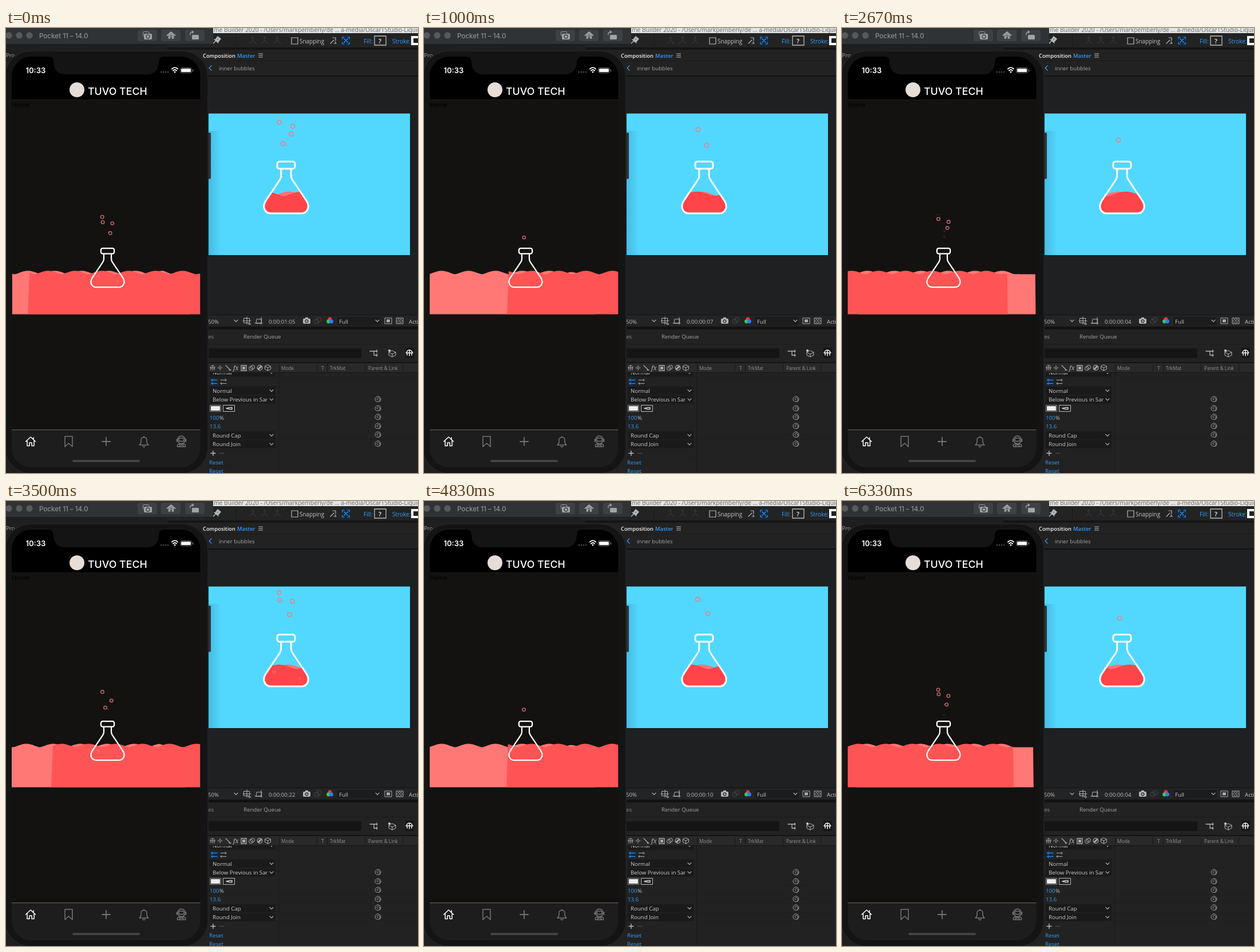
Recreate the animation shown at these times as an HTML page with a canvas. Size 720 px wide and 778 px high, loop 6.49 s.

```html
<!DOCTYPE html>
<html lang="en">
<head>
<meta charset="utf-8">
<title>Flask animation preview</title>
<style>
  html, body { margin: 0; height: 100%; overflow: hidden; background: #1f1f1f; }
  canvas { display: block; }
</style>
</head>
<body>
<canvas id="stage" width="720" height="778"></canvas>
<script>
const ctx = document.getElementById('stage').getContext('2d');
const UI = '"Open Sans", sans-serif', PHONE = 'Inter, sans-serif';
const BLUE = '#2f9cff', GREY = '#a4a4a4', WHITE = '#f4f4f4';

function box(x, y, w, h, color, r = 0) {
  ctx.fillStyle = color;
  ctx.beginPath();
  ctx.roundRect(x, y, w, h, r);
  ctx.fill();
}
function frame(x, y, w, h, color, r = 0, width = 1) {
  ctx.strokeStyle = color;
  ctx.lineWidth = width;
  ctx.beginPath();
  ctx.roundRect(x, y, w, h, r);
  ctx.stroke();
}
function circle(x, y, r, color, width) {
  ctx.beginPath();
  ctx.arc(x, y, r, 0, 7);
  if (width) { ctx.strokeStyle = color; ctx.lineWidth = width; ctx.stroke(); }
  else { ctx.fillStyle = color; ctx.fill(); }
}
function line(d, color, width = 1, x = 0, y = 0) {
  ctx.save();
  ctx.translate(x, y);
  ctx.strokeStyle = color;
  ctx.lineWidth = width;
  ctx.lineCap = ctx.lineJoin = 'round';
  ctx.stroke(new Path2D(d));
  ctx.restore();
}
function text(s, x, y, size, color, font = UI, weight = 400) {
  ctx.font = `${weight} ${size}px ${font}`;
  ctx.fillStyle = color;
  ctx.fillText(s, x, y);
}
function clipped(path, draw) {
  ctx.save();
  ctx.clip(path);
  draw();
  ctx.restore();
}
function rectPath(x, y, w, h, r = 0) {
  const p = new Path2D();
  p.roundRect(x, y, w, h, r);
  return p;
}
// Piecewise linear interpolation through [x, y] pairs.
function track(keys, x) {
  let i = 1;
  while (i < keys.length - 1 && x > keys[i][0]) i++;
  const [[x0, y0], [x1, y1]] = [keys[i - 1], keys[i]];
  return y0 + (y1 - y0) * (x - x0) / (x1 - x0);
}

// ---- flask scene; origin is the centre of the cap ----
const flask = new Path2D('M-8.7 7V18Q-8.7 22-11 25.5L-35.5 62C-43 74-36 84-27 84H27C36 84 43 74 35.5 62L11 25.5Q8.7 22 8.7 18V7');
const frontEdge = [[0, 172], [3.6, 148], [13.6, 77], [18, 41], [26.1, -4], [29.9, -20]];
const WAVE = 62.7, WIDTH = 413, CYCLE = 8.65, LIFE = 16.5;

function liquid(edge, crest, color, slant, flatEnd) {
  const left = (edge - 177.5) / 0.75;
  ctx.beginPath();
  ctx.moveTo(left - slant, 148);
  for (let d = 0; d <= WIDTH; d += 2) {
    const fade = Math.max(0, Math.min(1, (WIDTH - flatEnd - d) / 24));
    const lift = Math.abs(Math.cos(Math.PI * (left + d - crest) / WAVE)) ** 1.4;
    ctx.lineTo(left + d, 54 - 8 * lift * fade);
  }
  ctx.lineTo(left + WIDTH, 148);
  ctx.fillStyle = color;
  ctx.fill();
}
function liquids(p, front, back) {
  liquid(23 + 1.5 * (p - 26.1), -8 + 0.7 * (p - 3), back, 0, 36);
  liquid(track(frontEdge, p), 18.5 - 6.3 * (p - 3), front, 4, 0);
}
function risers(p, birth, size, place) {
  for (let k = 0; k < 3; k++) {
    const age = p - birth - k * CYCLE;
    if (age < 0 || age > LIFE + 2.5) continue;
    const [x, y] = place(age);
    if (age < LIFE) {
      circle(x, y, size * Math.min(1, 0.35 + age), '#f4797d', size * 0.4);
    } else if (size > 2) {
      for (let a = 0; a < 6; a++)
        circle(x + 5 * Math.cos(a), y + 5 * Math.sin(a), 0.6, '#d8979f');
    }
  }
}
function flaskScene(p) {
  risers(p, 3, 3.7, a => [-12.5 + 11 * Math.exp(-a / 3), -82 + 57 * Math.exp(-a / 4.7)]);
  risers(p, 6, 3.7, a => [12.5 - 11 * Math.exp(-a / 6), -74 + 52 * Math.exp(-a / 7)]);
  ctx.globalAlpha = 0.6;
  risers(p, 10, 1.4, a => [2 - Math.exp(-a / 4), -48 + 28 * Math.exp(-a / 4)]);
  if (p > 10 && p < 20) {
    circle(-21, 77 - p, 2.2, '#ff9a98', 1);
    circle(24, 88 - p, 1.5, '#ff9a98', 1);
  }
  ctx.globalAlpha = 1;
  frame(-15.5, -6.5, 31, 12.5, '#fff', 4, 3);
  ctx.lineWidth = 3;
  ctx.stroke(flask);
}

// ---- editor window ----
const chevron = (x, y) => line('M-3 -1.5L0 1.5L3 -1.5', GREY, 1.2, x, y);
const hr = (y, color = '#111', h = 1) => box(282, y, 438, h, color);
const label = (s, x, y, color, weight) => text(s, x, y, 9.7, color, UI, weight);

function spiral(x, y) {
  ctx.strokeStyle = '#a0a0a0';
  ctx.lineWidth = 1;
  ctx.beginPath();
  for (let a = 0; a < 14; a += 0.3) {
    const r = Math.min(5, a * 0.55);
    ctx.lineTo(x + r * Math.cos(a), y + r * Math.sin(a));
  }
  ctx.stroke();
}
function toolbar() {
  box(282, 0, 438, 9, '#e4e4e4');
  text('me Builder 2020 - /Users/markpemberly/de … a-media/OscarTStudio-Liquid', 363, 6.5, 10.3, '#6d6d6d');
  box(282, 9, 438, 25, '#232323');
  line('M-6 6L-2 2M-4 -1L3 5M-2 0L2 -6L7 -2L2 4Z', '#b5b5b5', 1.6, 368, 21);
  line('M-1 -1L2 -4L5 -2L2 2Z', '#b5b5b5', 3, 368, 21);
  box(402, 12, 1, 20, '#191919');
  for (const x of [431, 452, 474]) line('M0 -6V1L-6 6M0 1L6 6M0 -6L-2 -3M0 -6L2 -3', '#30363e', 1.3, x, 21);
  frame(499, 17, 11, 11, '#b8b8b8', 0, 1.2);
  text('Snapping', 513, 27, 9.9, '#c4c4c4');
  line('M-5 5L1 -1M-1 -5H4V0M1 5L5 5L3 2', '#b8b8b8', 1.2, 572, 22);
  box(586, 14, 17, 17, '#15283c');
  line('M-6 -3V-6H-3M3 -6H6V-3M6 3V6H3M-3 6H-6V3M-3 -3L3 3M3 -3L-3 3', BLUE, 1.2, 594, 22);
  text('Fill:', 625, 27, 10.2, BLUE);
  frame(644, 14, 20, 16, '#bbb', 0, 1.3);
  text('?', 651, 27, 11, WHITE, UI, 600);
  text('Stroke:', 675, 27, 10, BLUE);
  box(708, 14, 12, 16, '#fff');
  box(712, 18, 8, 8, '#202020');
  hr(34, '#151515', 4);
}
function viewer(p) {
  label('Pro', 0, 51, GREY);
  text('Composition', 344, 51.5, 9.3, WHITE, UI, 600);
  text('Master', 404, 51.5, 9.3, BLUE, UI, 600);
  line('M-3.5 -3H3.5M-3.5 0H3.5M-3.5 3H3.5', '#bbb', 1.1, 445, 48);
  hr(57, '#1a1a1a');
  line('M2 -4L-2 0L2 4', BLUE, 1.2, 357, 70);
  label('inner bubbles', 372, 74, GREY);
  hr(83, '#111', 2);
  hr(85, '#1f2022', 416);
  box(282, 149.5, 424, 247.5, '#52d8ff');
  const shade = ctx.createLinearGradient(352, 0, 376, 0);
  shade.addColorStop(0, '#0a305030');
  shade.addColorStop(1, '#0a305000');
  ctx.fillStyle = shade;
  ctx.fillRect(352, 180, 24, 217);

  ctx.save();
  ctx.translate(489.5, 240);
  clipped(flask, () => liquids(p, '#ff444a', '#ff7376'));
  flaskScene(p);
  ctx.restore();

  hr(501, '#131313');
  hr(502, '#242424', 20);
  label('50%', 353, 516.5, '#b8b8b8');
  chevron(402, 512);
  frame(415.5, 507.5, 10, 8, '#b0b0b0');
  line('M0 -7V6M-7 0H7M3 5L7 5L5 7Z', '#b0b0b0', 1, 421, 512);
  line('M-5 4L-4 -3H5L4 4ZM-7 4H6M4 -6V6', '#b0b0b0', 1, 442, 512);
  const frames = Math.floor(track([[0, 0], [1.6, 1.3], [3.7, 4.2], [4.7, 4.6], [7.8, 7.5], [17.7, 22.5], [19.8, 26.5], [21.5, 30.5], [29.1, 40]], p));
  const pad = n => String(n).padStart(2, '0');
  label(`0:00:${pad(Math.floor(frames / 25))}:${pad(frames % 25)}`, 459, 516.5, '#b8b8b8');
  box(519, 508, 13, 9, '#b5b5b5', 2);
  box(523, 506, 5, 3, '#b5b5b5');
  circle(525.5, 512.5, 2.4, '#242424', 1.2);
  circle(543, 513, 4, '#454545', 1);
  circle(547, 510, 4, '#454545', 1);
  circle(566, 509, 3.4, '#e33');
  circle(563.5, 513, 3.4, '#3c5');
  circle(568.5, 513, 3.4, '#37f');
  box(579, 505, 76, 15, '#1c1c1c', 2);
  label('Full', 582, 516.5, '#c8c8c8');
  chevron(649, 512);
  frame(662, 507, 12, 10, '#aaa');
  box(665, 509.5, 6, 5, '#aaa');
  frame(682, 507, 12, 10, '#aaa');
  line('M-4 -4L4 4M4 -4L-4 4M-5 0L0 -4L5 0L0 4Z', '#888', 1, 688, 512);
  label('Active', 704, 516.5, '#c8c8c8');
}
function timeline() {
  hr(522, '#121212', 5);
  hr(527, '#222', 251);
  label('es', 353, 543, '#8e8e8e');
  label('Render Queue', 415, 543, GREY);
  hr(552, '#1b1b1b');
  box(282, 560, 339, 17, '#151515', 2);
  line('M-7 -3H0V4H6M0 -3H6M5 -5V-1M5 2V6', '#b5b5b5', 1.3, 643, 568);
  line('M0 -4L6 -1V4L0 7L-6 4V-1ZM-6 -1L0 2L6 -1M0 2V7', '#b5b5b5', 1, 675, 568);
  circle(670, 564, 2, '#ccc');
  box(698, 559, 15, 18, '#161616');
  line('M-6 0H6M-4 0V4M0 -5V5M4 0V4M-5 0A5 5 0 0 1 5 0', WHITE, 1.5, 705, 568);
  hr(584, '#141414', 2);
  hr(586, '#292929', 16);
  line('M-4 0H4M-3 0V4M0 -4V4M3 0V4M-4 0A4 4 0 0 1 4 0', '#aaa', 1, 361, 594);
  circle(374, 594, 2, '#aaa', 1);
  line('M-4 0H-3.5M4 0H3.5M0 -4V-3.5M0 4V3.5', '#aaa', 1, 374, 594);
  line('M-4 -4L4 4M2 4H5', '#aaa', 1.3, 388, 594);
  text('fx', 397, 598, 11, '#b8b8b8', '"Noto Serif", serif', 'italic 400');
  frame(411, 590, 9, 9, '#aaa', 0, 1.3);
  box(413, 592, 5, 5, '#aaa');
  circle(428, 595, 3.5, '#aaa', 1);
  circle(431, 593, 3.5, '#aaa', 1);
  circle(443.5, 594, 4.3, '#aaa', 1.2);
  line('M-2 2L2 -2', '#aaa', 3, 443.5, 594);
  line('M0 -5L5 -2.5V2.5L0 5L-5 2.5V-2.5ZM-5 -2.5L0 0L5 -2.5M0 0V5', '#aaa', 1, 457.5, 594);
  for (const [s, x] of [['Mode', 481], ['T', 551], ['TrkMat', 566], ['Parent & Link', 633]]) text(s, x, 597.5, 8.3, '#929292');
  for (const x of [477, 543, 561, 627, 693]) box(x, 587, 1, 14, '#171717');
  hr(602, '#141414');
  for (let y = 610; y < 778; y += 15.55) hr(Math.round(y), '#1f1f1f');
  box(476, 603, 1, 175, '#191919');
  const menu = (s, y) => {
    box(356, y - 7, 115, 14, '#1a1a1a', 2);
    clipped(rectPath(356, y - 8, 101, 16), () => label(s, 361, y + 3.5, '#cdcdcd'));
    chevron(464, y);
  };
  clipped(rectPath(354, 603, 130, 7), () => menu('Normal', 602.5));
  box(356, 612, 15, 13, '#142a42');
  line('M-5 -3H5M-5 3H5M-3 -5L-5 -3L-3 -1M-3 1L-5 3L-3 5', BLUE, 1, 364, 618.5);
  line('M-5 -3H5M-5 3H5M3 -5L5 -3L3 -1M-3 1L-5 3L-3 5', '#aaa', 1, 380, 618.5);
  menu('Normal', 634);
  menu('Below Previous in Same Composite', 649.5);
  frame(356.5, 659.5, 19, 11, '#888');
  box(358, 661, 16, 8, '#ececec');
  frame(379.5, 659.5, 20, 11, '#bbb');
  line('M-5 0L1 -1.5H5V1.5H1Z', '#ccc', 1.5, 390, 665);
  label('100', 356, 684.5, BLUE, 500);
  label('%', 373, 684.5, '#bbb');
  label('13.6', 356, 700, BLUE, 500);
  menu('Round Cap', 712);
  menu('Round Join', 727.5);
  line('M-4 0H4M0 -4V4', '#bbb', 1.4, 362, 743.5);
  line('M-4 0H4', '#444', 1.4, 377, 743.5);
  label('Reset', 355, 762.5, BLUE, 500);
  label('Reset', 355, 777.5, BLUE, 500);
  for (const y of [649, 665, 680, 696, 711, 727]) spiral(650, y);
}

// ---- phone simulator ----
function simulatorBar() {
  box(0, 0, 362, 29, '#303336');
  box(0, 28, 362, 1, '#191a1b');
  for (const x of [5, 23, 41]) circle(x, 13, 5.7, '#57595b');
  text('Pocket 11 – 14.0', 58, 17.5, 11.6, '#8d9093', PHONE, 500);
  for (const x of [230, 271, 313]) box(x, 3, 34, 20, '#3d4144', 4);
  frame(239.5, 6.5, 10, 7, '#9b9ea1', 1);
  box(241, 10, 14, 10, '#a1a4a7', 2);
  circle(248, 15, 3, '#3d4144', 1.3);
  line('M-7 0L0 -6L7 0M-4 0V5H-2V1H2V5H4V0L0 -3Z', '#a1a4a7', 1.7, 288.5, 13);
  box(325, 12, 12, 8, '#a1a4a7', 1.5);
  line('M-4 0V-2C-4 -4 -3 -5 1 -5M-1 -7L2 -5L-1 -3', '#a1a4a7', 1.3, 326, 12);
}
function tabBar() {
  box(10, 702, 330, 66, '#1d1d1e');
  box(10, 702, 330, 1, '#68686a');
  line('M-8.5 0L0 -8L8.5 0M-6 -1.5V7.5H-2V2H2V7.5H6V-1.5M5 -7V-4', '#fff', 1.5, 43, 723);
  line('M-6.5 -9H6.5V9L0 3L-6.5 9Z', '#747476', 1.5, 109.5, 723);
  line('M-7 0H7M0 -7V7', '#747476', 1.8, 175, 723);
  line('M-8 6C-4 3-5 -1-5 -3C-5 -9 5 -9 5 -3C5 -1 4 3 8 6ZM-2 8C-1 10 1 10 2 8M0 -9V-8', '#747476', 1.5, 241, 723);
  circle(306.5, 720, 6.7, '#747476', 1.6);
  frame(302, 717, 9, 5.5, '#747476', 2.5, 1.4);
  line('M-7 9V6C-5 3 5 3 7 6V9ZM-3 9V6H3V9M-8 -4V0M8 -4V0', '#747476', 1.5, 306.5, 723);
  box(116, 755, 118, 4, '#434344', 2);
}
function phone(p) {
  box(353, 183, 5, 81, '#303234', 2);
  box(-3, 39, 357, 741, '#141415', 46);
  frame(-2, 40, 355, 739, '#252627', 45, 1.5);
  clipped(rectPath(10, 50, 329.5, 718, 34), () => {
    box(10, 50, 330, 76, '#000');
    box(10, 126, 330, 576, '#131211');
    box(10, 125, 330, 1, '#1d1d1d');
    text('Home', 10, 138, 11, '#030303', PHONE, 500);
    text('10:33', 34.5, 78.5, 13, '#fff', PHONE, 600);
    for (let x = 271; x < 286; x += 4) circle(x, 77, 1.3, '#4a4a4a');
    line('M-5 -2C-2 -5 2 -5 5 -2M-3 1C-1 -1 1 -1 3 1', '#fff', 1.9, 295, 73.5);
    circle(295, 77, 1.4, '#fff');
    frame(304.5, 69.5, 20, 9, '#777', 3);
    box(306, 71, 17, 6, '#fff', 1.5);
    box(326, 72.5, 1.3, 3.5, '#777');
    circle(124, 108, 13, '#e6ddd7');
    text('TUVO TECH', 143, 116.5, 17.8, '#fff', PHONE, 500);
    clipped(rectPath(10, 314, 329.5, 186.5), () => {
      ctx.translate(177.5, 390);
      ctx.scale(0.75, 0.75);
      liquids(p, '#ff5455', '#ff7875');
      flaskScene(p);
    });
    tabBar();
  });
  ctx.fillStyle = '#141415';
  ctx.fill(new Path2D('M73 46H277V50Q267 50 267 59C267 73 259 81 247 81H103C91 81 83 73 83 59Q83 50 73 50Z'));
}

function draw() {
  const t = Math.floor((performance.now() % 6490 + 4) * 6 / 1000) / 6;
  box(0, 0, 720, 778, '#1f1f1f');
  box(282, 34, 438, 744, '#222');
  toolbar();
  viewer((21.5 + 15.6 * t) % 29.1);
  timeline();
  simulatorBar();
  phone((18 + 15.8 * t) % 30.2);
  requestAnimationFrame(draw);
}
draw();
</script>
</body>
</html>
```
